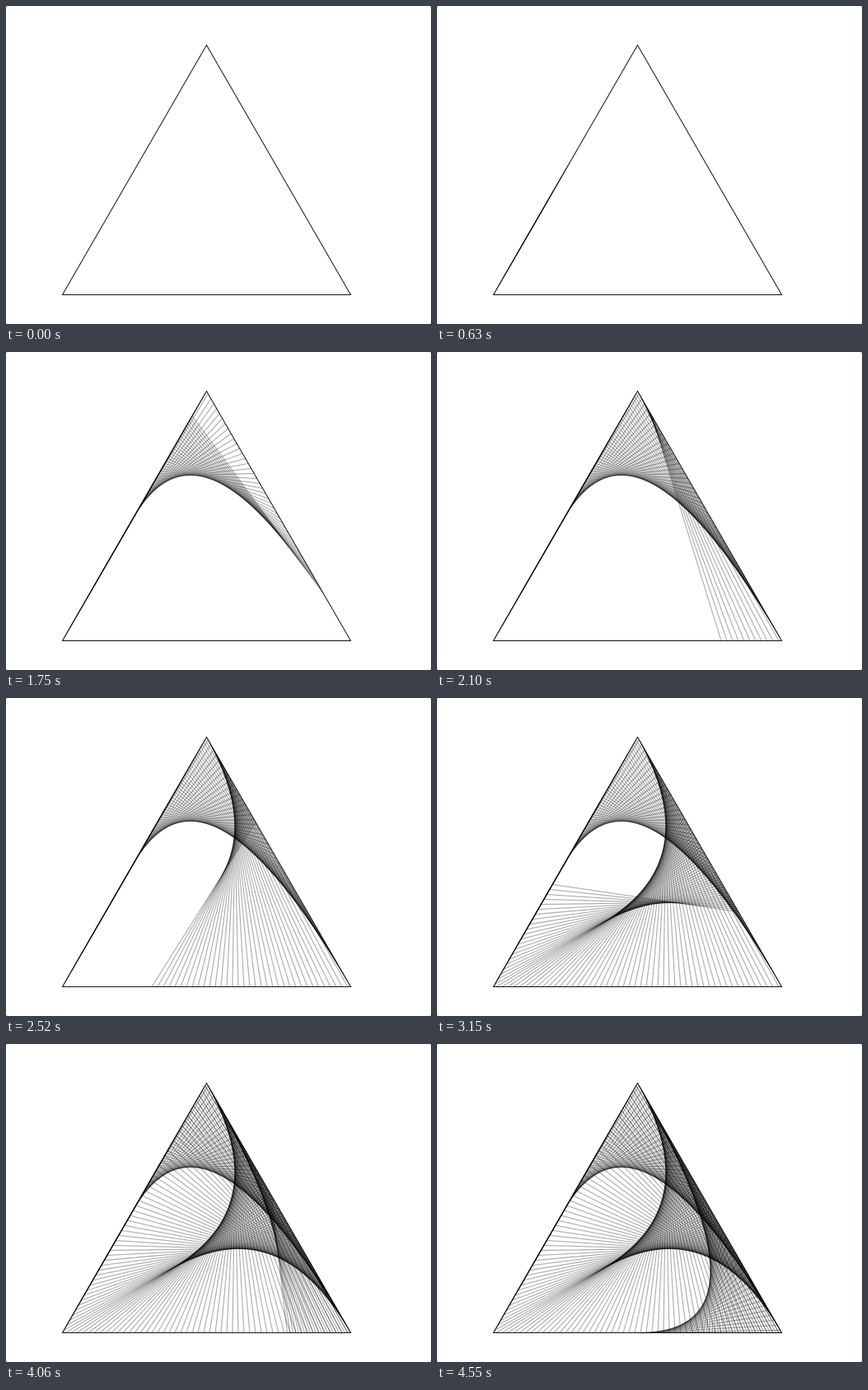
Write an HTML page with a canvas that moves like this. It is 516x386 px and loops after 5040 ms.

```html
<!DOCTYPE html>
<html lang="en">
<head>
<meta charset="utf-8">
<title>Triangle string art</title>
<style>
  html, body {
    margin: 0;
    width: 100%;
    height: 100%;
    overflow: hidden;
    background: #666;
  }
  canvas {
    display: block;
    width: 516px;
    height: 386px;
    background: #fff;
    border-radius: 2.5px;
  }
</style>
</head>
<body>
<canvas id="stage" width="1032" height="772"></canvas>
<script>
  const ctx = document.getElementById('stage').getContext('2d');
  const LOOP = 5040, STEP = 70, LAST = 65;
  const PINS = 100; // per side
  const corners = [[68.5, 350.5], [243.5, 47.5], [418.5, 350.5]];

  // Drawn at double size so that overlapping threads stay smooth.
  ctx.scale(2, 2);

  // Pins are numbered clockwise around the triangle.
  function pin(n) {
    const i = n % (3 * PINS);
    const side = Math.floor(i / PINS);
    const f = (i % PINS) / PINS;
    const [ax, ay] = corners[side];
    const [bx, by] = corners[(side + 1) % 3];
    return [ax + (bx - ax) * f, ay + (by - ay) * f];
  }

  function line(a, b) {
    ctx.beginPath();
    ctx.moveTo(...a);
    ctx.lineTo(...b);
    ctx.stroke();
  }

  function draw(step) {
    ctx.fillStyle = '#fff';
    ctx.fillRect(0, 0, 516, 386);

    ctx.lineWidth = 1;
    ctx.strokeStyle = '#111';
    ctx.beginPath();
    corners.forEach(p => ctx.lineTo(...p));
    ctx.closePath();
    ctx.stroke();

    // Each thread joins pin k to pin 2k + 1.
    ctx.lineWidth = 1.15;
    ctx.strokeStyle = 'rgba(0, 0, 0, 0.32)';
    const last = 4 * step - 10;
    for (let k = 0; k <= last; k++) line(pin(k), pin(2 * k + 1));
  }

  const start = performance.now();
  let shown = -1;

  function tick() {
    const t = (performance.now() - start) % LOOP;
    const step = Math.min(LAST, Math.floor(t / STEP));
    if (step !== shown) draw(shown = step);
    requestAnimationFrame(tick);
  }
  tick();
</script>
</body>
</html>
```
